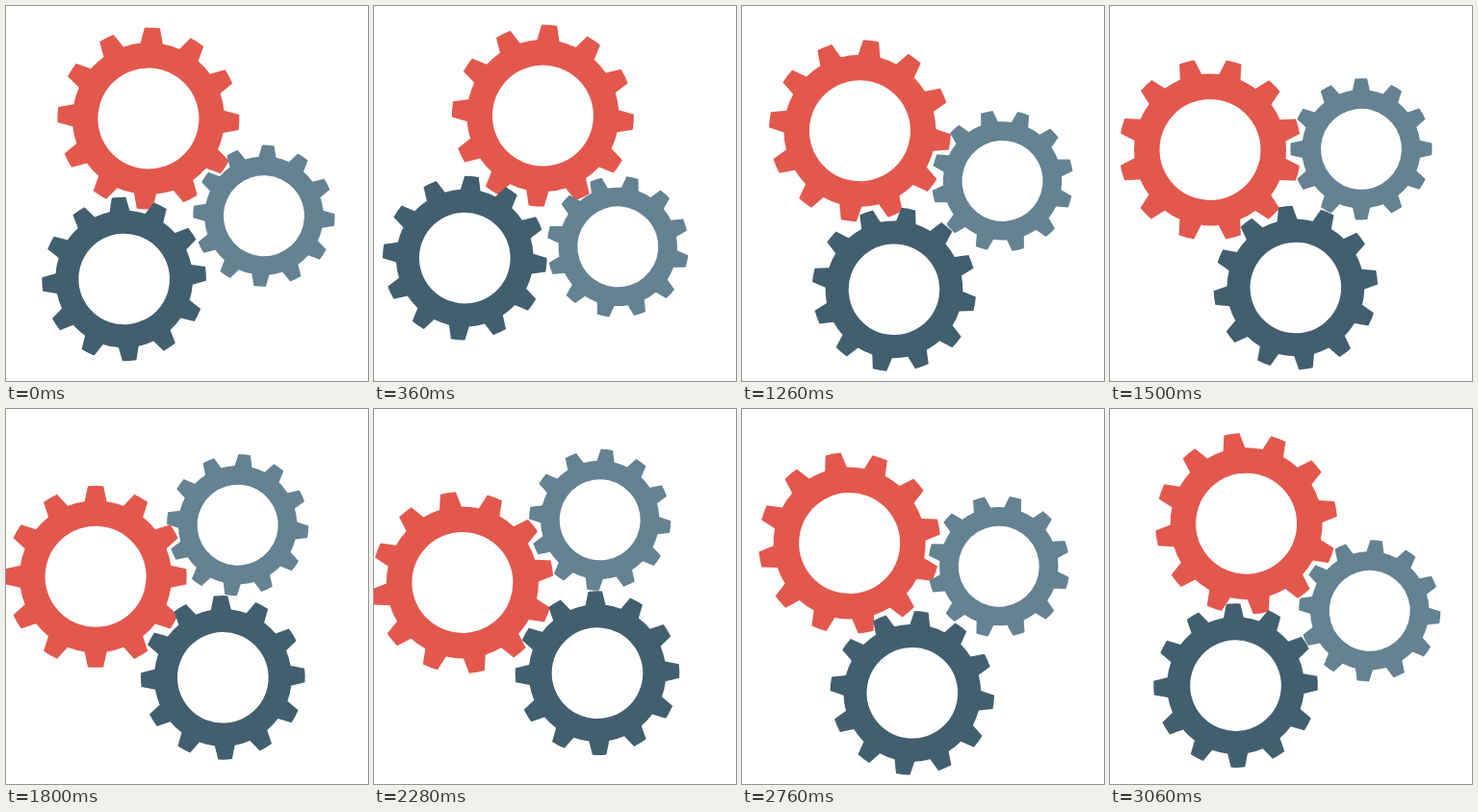
These frames come from a looping animation (376x390 px, 3.12 s). An HTML page:

```html
<!DOCTYPE html>
<html lang="en">
<head>
<meta charset="utf-8">
<title>Turning gears</title>
<style>
  html, body { margin: 0; width: 100%; height: 100%; overflow: hidden; background: #fff; }
  svg { display: block; width: 376px; height: 390px; }
</style>
</head>
<body>
<svg viewBox="0 0 376 390"><g id="train"></g></svg>
<script>
  const STEP = 60, STEPS = 52, TEETH = 12;
  const PIVOT = "170 193";

  // angle: tooth offset at the start; dir: spin direction inside the train
  const gears = [
    { x: 148,   y: 117,   outer: 94.5, root: 79,   hole: 52.5, angle: 2.5,  dir: 1,  fill: "#e2584d" },
    { x: 267.9, y: 218.3, outer: 73.6, root: 61.7, hole: 42,   angle: 3.4,  dir: -1, fill: "#648292" },
    { x: 122.6, y: 283.9, outer: 85.3, root: 71.4, hole: 47.3, angle: -3.7, dir: -1, fill: "#425f70" }
  ];

  const train = document.getElementById("train");

  function polar(radius, deg) {
    const a = deg * Math.PI / 180;
    return (radius * Math.cos(a)).toFixed(2) + " " + (radius * Math.sin(a)).toFixed(2);
  }

  function gearPath({ outer, root, hole }) {
    const tip = 4.9, base = 8.4, pitch = 360 / TEETH;
    let d = "M" + polar(root, -base);
    for (let i = 0; i < TEETH; i++) {
      const mid = i * pitch;
      d += `L${polar(outer, mid - tip)}A${outer} ${outer} 0 0 1 ${polar(outer, mid + tip)}`
         + `L${polar(root, mid + base)}A${root} ${root} 0 0 1 ${polar(root, mid + pitch - base)}`;
    }
    return d + `ZM${hole} 0A${hole} ${hole} 0 1 0 ${-hole} 0A${hole} ${hole} 0 1 0 ${hole} 0Z`;
  }

  for (const gear of gears) {
    gear.node = document.createElementNS("http://www.w3.org/2000/svg", "path");
    gear.node.setAttribute("d", gearPath(gear));
    gear.node.setAttribute("fill", gear.fill);
    gear.node.setAttribute("fill-rule", "evenodd");
    train.appendChild(gear.node);
  }

  const ease = u => u * u * (3 - 2 * u);

  // The train swings a quarter turn back in 27 steps and forth in 25.
  function swing(step) {
    const high = 21.7, range = 90, down = 27, up = STEPS - down;
    const n = (step + STEPS - 8) % STEPS;
    return n < down
      ? high - range * ease(n / down)
      : high - range * (1 - ease((n - down) / up));
  }

  function draw(time) {
    const step = Math.floor(time / STEP) % STEPS;
    train.setAttribute("transform", `rotate(${swing(step)} ${PIVOT})`);
    for (const { node, x, y, angle, dir } of gears) {
      const turn = angle + dir * 360 * step / STEPS;
      node.setAttribute("transform", `translate(${x} ${y}) rotate(${turn})`);
    }
  }

  function tick() {
    draw(performance.now());
    requestAnimationFrame(tick);
  }
  tick();
</script>
</body>
</html>
```
